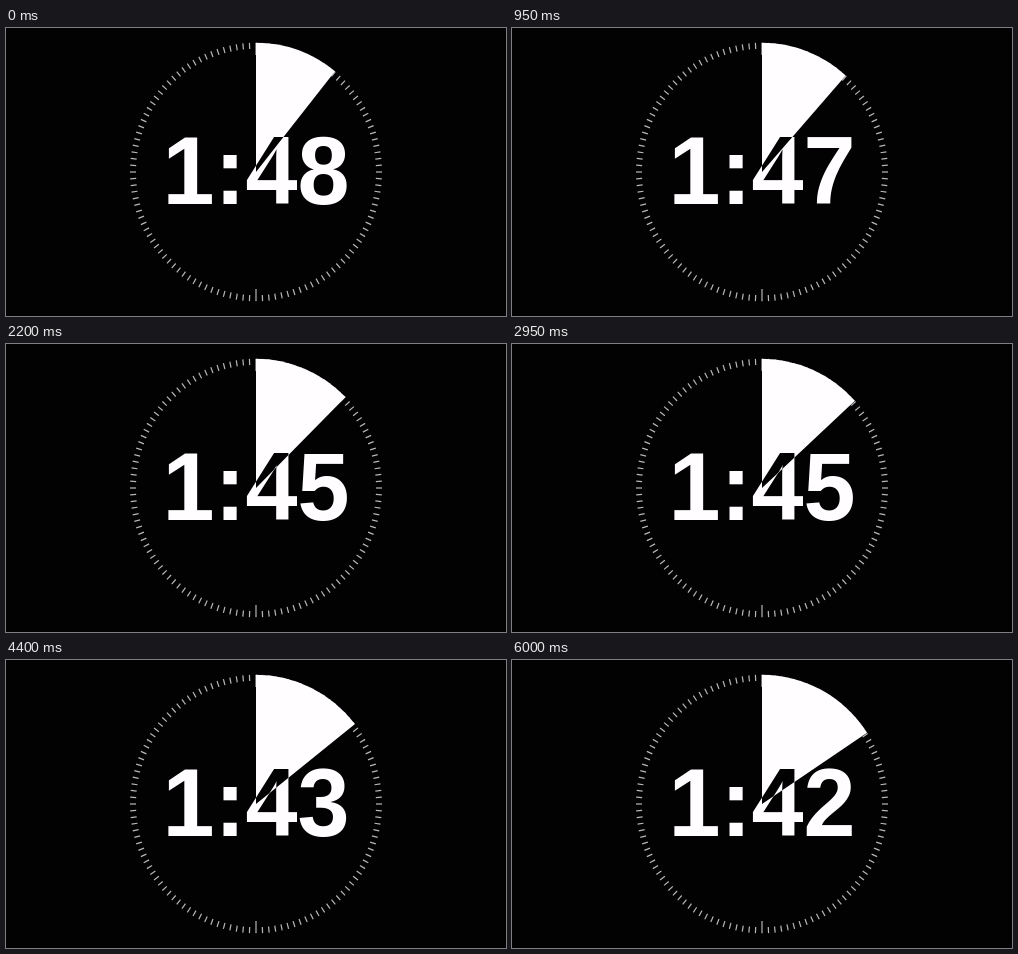
Write an HTML page with a canvas that moves like this. It is 500 by 288 pixels and loops after 6050 ms.

```html
<!DOCTYPE html>
<html lang="en">
<head>
<meta charset="utf-8">
<title>Countdown</title>
<style>
  html, body { margin: 0; height: 100%; overflow: hidden; background: #020203; }
  canvas { display: block; }
</style>
</head>
<body>
<canvas id="stage" width="500" height="288"></canvas>
<script>
const ctx = document.getElementById('stage').getContext('2d');
const LOOP = 6050, STEP = 50;
const TOTAL = 120, SECOND = 1020;   // one counted second lasts slightly over 1 s
const R = 126, STRETCH = 1.026;     // the whole dial is slightly taller than wide
const DEG = Math.PI / 180;

function drawTicks() {
  ctx.strokeStyle = '#b8b7b9';
  ctx.lineWidth = 1.2;
  for (let i = 0; i < TOTAL; i++) {
    ctx.save();
    ctx.rotate(i * 3 * DEG);
    ctx.beginPath();
    ctx.moveTo(0, -R);
    ctx.lineTo(0, -R + (i % 60 ? 6 : 12));
    ctx.stroke();
    ctx.restore();
  }
}

function drawWedge(angle) {
  ctx.beginPath();
  ctx.moveTo(0, 0);
  ctx.arc(0, 0, R, -90 * DEG, (angle - 90) * DEG);
  ctx.fill();
}

function drawTime(left) {
  const text = Math.floor(left / 60) + ':' + String(left % 60).padStart(2, '0');
  ctx.globalCompositeOperation = 'xor';   // digits invert inside the wedge
  ctx.font = 'bold 93.5px "Liberation Sans", Arial, sans-serif';
  ctx.textAlign = 'center';
  ctx.fillText(text, 0, 31.2);
}

function frame(now) {
  const t = Math.floor(now % LOOP / STEP) * STEP;
  const elapsed = 13 + (t - 50) / SECOND;
  ctx.clearRect(0, 0, 500, 288);
  ctx.save();
  ctx.translate(250, 144);
  ctx.scale(1, STRETCH);
  ctx.fillStyle = '#fffdff';
  drawTicks();
  drawWedge(elapsed * 3);
  drawTime(Math.ceil(TOTAL - elapsed - 1e-6));
  ctx.restore();
}

const start = performance.now();
function loop() {
  frame(performance.now() - start);
  requestAnimationFrame(loop);
}
loop();
</script>
</body>
</html>
```
